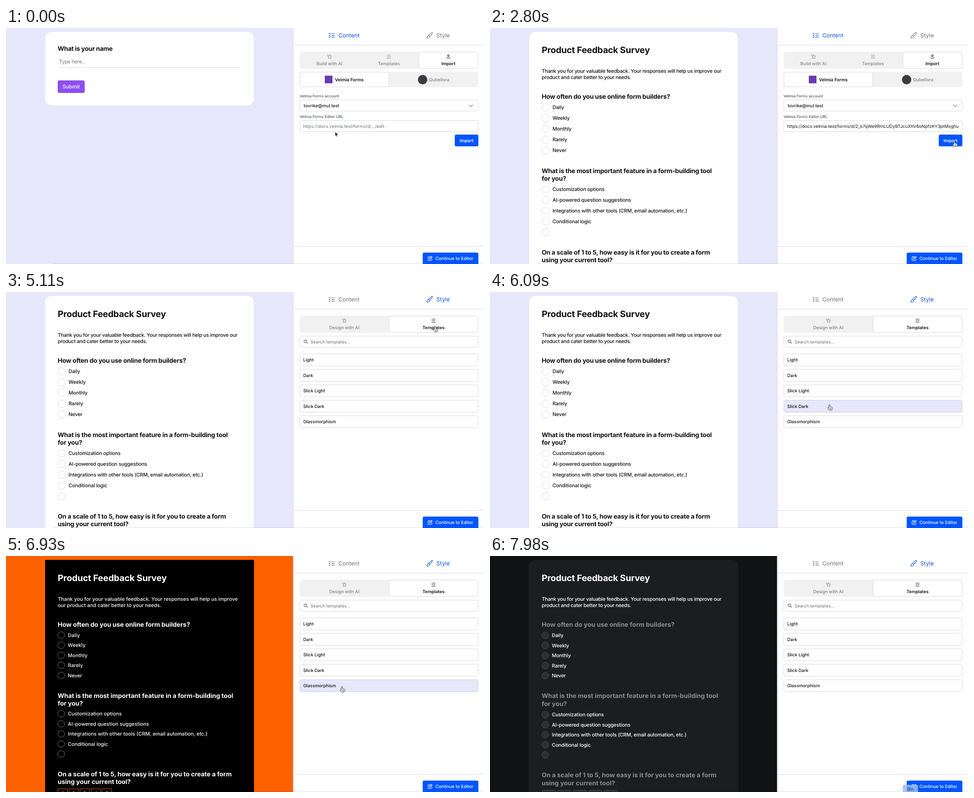
An HTML page that plays this animation: 1063x527 px, repeating every 8 s.

```html
<!DOCTYPE html>
<html lang="en">
<head>
<meta charset="utf-8">
<title>Form import and styling</title>
<style>
  html, body { margin: 0; width: 100%; height: 100%; overflow: hidden; background: #fff; }
  svg { display: block; }
  text { font-family: Inter, sans-serif; text-rendering: geometricPrecision; white-space: pre; }
</style>
</head>
<body>
<svg id="stage" width="1063" height="527" viewBox="0 0 1063 527"></svg>
<script>
const LOOP = 8000, TICK = 70;
const BLUE = '#0055ff', ACTIVE = '#0b55dc', INK = '#111214', GRAY = '#6f7278', BORDER = '#d6d8dc', LILAC = '#e6e7fa';
const stage = document.getElementById('stage');

// Drawing helpers; text is placed by the middle of its capitals.
const text = (x, y, s, { size = 9.8, fill = INK, weight = 400, anchor = 'start', spacing = 0 } = {}) =>
  `<text x="${x}" y="${y + size * .36}" font-size="${size}" fill="${fill}" font-weight="${weight}" text-anchor="${anchor}" letter-spacing="${spacing}">${s}</text>`;
const rect = (x, y, w, h, r, fill, stroke = 'none', width = 1) =>
  `<rect x="${x}" y="${y}" width="${w}" height="${h}" rx="${r}" fill="${fill}" stroke="${stroke}" stroke-width="${width}"/>`;
const circle = (x, y, r, fill, stroke = 'none') =>
  `<circle cx="${x}" cy="${y}" r="${r}" fill="${fill}" stroke="${stroke}"/>`;
const icon = (x, y, d, color, width = 1, fill = 'none') =>
  `<path transform="translate(${x} ${y})" d="${d}" fill="${fill}" stroke="${color}" stroke-width="${width}" stroke-linecap="round" stroke-linejoin="round"/>`;
const field = (y, h = 25, fill = '#fff', stroke = BORDER) => rect(653.5, y + .5, 396.5, h, 4.5, fill, stroke);

const ICONS = {
  checklist: 'M-6-4l1.2 1.2L-2.6-5M-6 0l1.2 1.2L-2.6-1M-6 4l1.2 1.2L-2.6 3M0-3.5H6.5M0 .3H6.5M0 4.1H6.5',
  brush: 'M-2 0Q2-5 5.5-6.4 7-6.6 6.4-5 4.6-1 0 2.6zM-2 0Q-4.6 0-4.8 3-5 5-6.5 5.5-3.6 7.4-1.2 5.4 0 4.2 0 2.6z',
  sparkle: 'M.8-4.4L2-1.4 5-1.2 2.8 1 3.4 4.2 .6 2.6-2.2 4.2-1.5 1-3.8-1-.5-1.4zM-4.2-3.6h1.6M-3.4-4.4v1.6',
  lines: 'M-4-3.5H4M-4 0H4M-4 3.5H4',
  download: 'M0-4.2V1M-2-1L0 1 2-1M-3.6 1.2Q-4 4-2 4H2Q4 4 3.6 1.2M-2.8-2Q-2-4.5 0-4.3 2-4.5 2.8-2',
  search: 'M-4-.8a3.3 3.3 0 1 0 6.6 0a3.3 3.3 0 1 0-6.6 0M1.8 1.8L4.6 4.6',
  edit: 'M0-4H-2.6Q-4.4-4-4.4-2.2V2.8Q-4.4 4.6-2.6 4.6H2.2Q4 4.6 4 2.8V.6M-1.5 1.6L-1-.6 3.2-4.6 4.9-3 .7 1.2z',
  chevron: 'M-4-2L0 2.2 4-2'
};
const CURSORS = {
  arrow: ['M0 0V9.6L2.2 7.5 3.7 10.9 5.3 10.2 3.8 6.9H6.9z', '#fff', .7, '#111'],
  hand: ['M-1.3.9a1.3 1.3 0 0 1 2.6 0V4.2L4.8 5q1.7.4 1.6 2L6 9.8Q5.6 12 3.6 12H.2Q-1 12-1.8 10.6L-3.8 7.4q-.5-1.2.6-1.6 1-.2 1.9 1.2zM1.2 7.4v2.6M3.2 7.4v2.6', '#222', .9, '#fff'],
  beam: ['M-2-5.5Q0-5.5 0-4V4Q0 5.5-2 5.5M2-5.5Q0-5.5 0-4M0 4Q0 5.5 2 5.5', '#222', .9, 'none']
};

// Left side: the form preview
const THEMES = {
  light: {
    bg: LILAC, card: '#fff', edge: '#dcddec', radius: 15, ink: INK, question: INK, ring: '#d8dae1', fill: '#fff',
    r: 8.3, step: 24, labelX: 139, lists: [177.3, 360], q2: 318.5, q3: 501, lead: 17.2, tight: true, headTight: -.24
  },
  slick: {
    bg: '#fe6100', card: '#000', edge: 'none', radius: 0, ink: '#fff', question: '#fff', ring: '#77797c', fill: '#000',
    r: 7.5, step: 22.5, labelX: 137.5, lists: [176.7, 352.2], q2: 311.5, q3: 487, lead: 17, headTight: -.03,
    scale: { y: 520, w: 21, step: 24.6, r: 0, stroke: '#d95a12', fill: '#000' }
  },
  glass: {
    bg: '#111213', card: '#1b1e1f', edge: '#212425', radius: 14, ink: '#fff', question: '#8b8d8e', ring: '#4a4d4e', fill: '#2c2f30',
    r: 7.5, step: 22.5, labelX: 137.5, lists: [177.3, 354.2], q2: 312.3, q3: 489.2, lead: 17.6, tight: true, headTight: 0,
    scale: { y: 523, w: 30.5, step: 34.5, r: 4, stroke: '#4a4d4e', fill: '#2c2f30' }
  }
};
const OPTIONS = [
  ['Daily', 'Weekly', 'Monthly', 'Rarely', 'Never'],
  ['Customization options', 'AI-powered question suggestions', 'Integrations with other tools (CRM, email automation, etc.)', 'Conditional logic', '']
];

const backdrop = (th, h) => rect(0, 0, 639, 527, 0, th.bg) +
  rect(86.5, 9, 465.5, h, th.radius, th.edge) + rect(87, 8.7, 464.5, h, th.radius, th.card);

function starterForm() {
  return backdrop(THEMES.light, 164.5) +
    text(115, 45.5, 'What is your name', { size: 14, weight: 700, spacing: -.3 }) +
    text(118, 75, 'Type here..', { size: 11.2, fill: '#75777c', spacing: -.28 }) +
    rect(115, 88, 408, 1, 0, '#dcdde1') +
    rect(115, 117, 60, 28, 4, '#8f4df1') +
    text(145, 131.3, 'Submit', { size: 11.6, fill: '#fff', weight: 500, anchor: 'middle' });
}

function survey(th) {
  const heading = (y, lines) => lines.map((s, i) =>
    text(115, y + i * th.lead, s, { size: 14, weight: 700, fill: th.question, spacing: th.headTight })).join('');
  const intro = 'Thank you for your valuable feedback. Your responses will help us improve';
  const rest = 'product and cater better to your needs.';
  const body = th.tight ? [intro + ' our', rest] : [intro, 'our ' + rest];
  let out = backdrop(th, 540) +
    text(115, 48.5, 'Product Feedback Survey', { size: 19.6, weight: 700, fill: th.ink, spacing: th.tight ? -.24 : -.16 }) +
    body.map((s, i) => text(115, 96 + i * 13.5, s, { size: 11.2, weight: 500, fill: th.ink, spacing: th.tight ? -.28 : 0 })).join('') +
    heading(153.3, ['How often do you use online form builders?']) +
    heading(th.q2, ['What is the most important feature in a form-building tool', 'for you?']) +
    heading(th.q3, ['On a scale of 1 to 5, how easy is it for you to create a form', 'using your current tool?']);
  OPTIONS.forEach((list, k) => list.forEach((label, i) => {
    const y = th.lists[k] + i * th.step;
    out += circle(115 + th.r + .4, y, th.r, th.fill, th.ring) +
      text(th.labelX, y, label, { size: 11.2, weight: 500, fill: th.ink, spacing: th.tight ? -.19 : 0 });
  }));
  const sc = th.scale;
  if (sc) for (let i = 0; i < 5; i++) {
    const x = 115.5 + i * sc.step;
    out += rect(x, sc.y, sc.w, 24, sc.r, sc.fill, sc.stroke) +
      text(x + sc.w / 2, sc.y + 9, i + 1, { size: 9.8, fill: th.ink, weight: 500, anchor: 'middle' });
  }
  return out;
}

// Right side: the editor panel
function tabs(items, active) {
  const w = 397 / items.length;
  return rect(653, 53, 397.5, 38, 5, '#f1f1f2') + items.map(([name, glyph], i) => {
    const on = i === active, cx = 653 + w * (i + .5), color = on ? INK : '#808287';
    return (on ? rect(653.5 + w * i, 53.5, w - .5, 37, 5, '#fff', BORDER) : '') +
      icon(cx, 64, ICONS[glyph], color, .9) +
      text(cx, 79, name, { fill: color, weight: on ? 600 : 500, anchor: 'middle' });
  }).join('');
}

const button = (x, y, w, h, label) => rect(x, y, w, h, 3.5, BLUE) +
  text(x + w / 2, y + h / 2, label, { fill: '#fff', weight: 600, anchor: 'middle' });

function spinner(t) {
  let out = rect(1017, 238, 33.5, 26.2, 3.5, '#7099fb');
  for (let i = 0; i < 8; i++) {
    const a = (i + t / 140) * Math.PI / 4;
    out += `<circle cx="${1033.8 + 4.2 * Math.cos(a)}" cy="${251.3 + 4.2 * Math.sin(a)}" r=".8" fill="#fff" opacity="${.35 + i * .09}"/>`;
  }
  return out;
}

function importPane(t) {
  const pasted = t >= 700, focused = t >= 280 && t < 1680, busy = t >= 1680 && t < 2730;
  const base = 'https://docs.velmia.test/forms/d/';
  const url = base + (pasted ? '2_k7qWe9RmLUDyBTJcuXhV6oNpfzKY3ptMxghu84b' : '.../edit');
  return tabs([['Build with AI', 'sparkle'], ['Templates', 'lines'], ['Import', 'download']], 2) +
    rect(653, 98, 397.5, 34, 5, '#f1f1f2') + rect(653.5, 98.5, 198, 33, 5, '#fff', BORDER) +
    rect(709, 106.5, 17, 17, 0, '#6a3ab2') +
    text(731.5, 115.3, 'Velmia Forms', { weight: 600 }) +
    circle(926.5, 115.3, 10.5, '#3a3b3e') +
    text(940.5, 115.3, 'Qubellora', { weight: 500, fill: '#808287' }) +
    text(653, 151.7, 'Velmia Forms account', { size: 8.4, fill: '#34373d' }) +
    field(160) + text(662, 173.3, 'tovrike@mul.test', { weight: 500 }) + icon(1034, 173.6, ICONS.chevron, GRAY, 1.1) +
    text(653, 197.7, 'Velmia Forms Editor URL', { size: 8.4, fill: '#34373d' }) +
    (focused ? rect(653, 206, 397.5, 26, 5, '#fff', BLUE, 1.6) : field(206)) +
    `<svg x="660" y="208" width="382" height="22">${text(.5, 11, url, { fill: pasted ? INK : GRAY })}</svg>` +
    (busy ? spinner(t) : button(998, 238, 52.5, 26.2, 'Import'));
}

const ROWS = ['Light', 'Dark', 'Slick Light', 'Slick Dark', 'Glassmorphism'];
const rowTop = i => 137.7 + i * 34.5;

function stylePane(t, cursor) {
  const templates = t >= 5110;
  const head = tabs([['Design with AI', 'sparkle'], ['Templates', 'lines']], templates ? 1 : 0);
  if (!templates) return head + field(98, 279) + button(990, 384, 60.5, 26.2, 'Design');
  return head + field(98) + icon(666.5, 111, ICONS.search, '#333', 1) +
    text(677, 111.2, 'Search templates...', { fill: GRAY }) +
    ROWS.map((name, i) => {
      const over = inside(cursor, [653, rowTop(i), 397, 27]);
      return field(rowTop(i), 26.8, over ? LILAC : '#fff', over ? '#c8cae4' : BORDER) +
        text(661, rowTop(i) + 13.8, name, { weight: 500 });
    }).join('');
}

function panel(t, cursor) {
  const styling = t >= 4200, left = styling ? GRAY : ACTIVE, right = styling ? ACTIVE : GRAY;
  return rect(638.5, 0, 425, 527, 0, '#fff') + rect(638.5, 0, 1, 527, 0, BORDER) +
    rect(639, 38, 424, 1, 0, BORDER) + rect(639, 487, 424, 1, 0, BORDER) +
    rect(105, 524.5, 958, 3, 0, 'rgba(0,0,0,.06)') +
    icon(724, 16.3, ICONS.checklist, left, 1.1) + text(739, 16.4, 'Content', { size: 12.6, fill: left }) +
    icon(942, 16.3, ICONS.brush, right, 1.1) + text(957, 16.4, 'Style', { size: 12.6, fill: right }) +
    (styling ? stylePane(t, cursor) : importPane(t)) +
    rect(926.7, 501.5, 123.8, 30, 3.5, BLUE) + icon(943, 514.6, ICONS.edit, '#fff', 1.1) +
    text(955, 514.5, 'Continue to Editor', { fill: '#fff', weight: 500 });
}

// Pointer: [start, end, x, y] moves, eased
const MOVES = [
  [0, 140, 724, 219], [910, 1470, 1033, 253], [3360, 3990, 960, 22], [4620, 4900, 954, 77],
  [5390, 6090, 755, 252], [6720, 6930, 747, 292], [7700, 7980, 935, 540]
];
const inside = ([px, py], [x, y, w, h]) => px >= x && px <= x + w && py >= y && py <= y + h;

function pointerAt(t) {
  let x = 732, y = 232;
  for (const [start, end, toX, toY] of MOVES) {
    const p = Math.min(1, Math.max(0, (t - start) / (end - start))), e = p * p * (3 - 2 * p);
    x += (toX - x) * e;
    y += (toY - y) * e;
  }
  return [x, y];
}

function pointer(t, pos) {
  const styling = t >= 4200;
  const clickable = [[640, 0, 423, 38], [653, 53, 397, styling ? 38 : 79],
    ...(styling ? ROWS.map((_, i) => [653, rowTop(i), 397, 27]) : [[653, 160, 397, 26], [998, 238, 53, 26]]),
    [927, 501, 124, 26]];
  const input = styling ? [653, 98, 397, 26] : [653, 206, 397, 25.5];
  const kind = inside(pos, input) ? 'beam' : clickable.some(r => inside(pos, r)) ? 'hand' : 'arrow';
  const [d, stroke, width, fill] = CURSORS[kind];
  return icon(...pos, d, stroke, width, fill);
}

function scene(t) {
  const pos = pointerAt(t);
  const form = t < 2730 ? starterForm() : survey(t < 6300 ? THEMES.light : t < 7350 ? THEMES.slick : THEMES.glass);
  const dockLabel = t < 7980 ? '' :
    rect(918, 511, 34, 20, 3, 'rgba(155,187,250,.85)') +
    text(935, 520.5, 'Bin', { size: 10.2, fill: '#213a78', anchor: 'middle' });
  return form + panel(t, pos) + pointer(t, pos) + dockLabel;
}

const began = performance.now();
let shown = -1;
function frame() {
  const t = Math.floor((performance.now() - began) % LOOP / TICK) * TICK;
  if (t !== shown) stage.innerHTML = scene(shown = t);
  requestAnimationFrame(frame);
}
frame();
</script>
</body>
</html>
```
